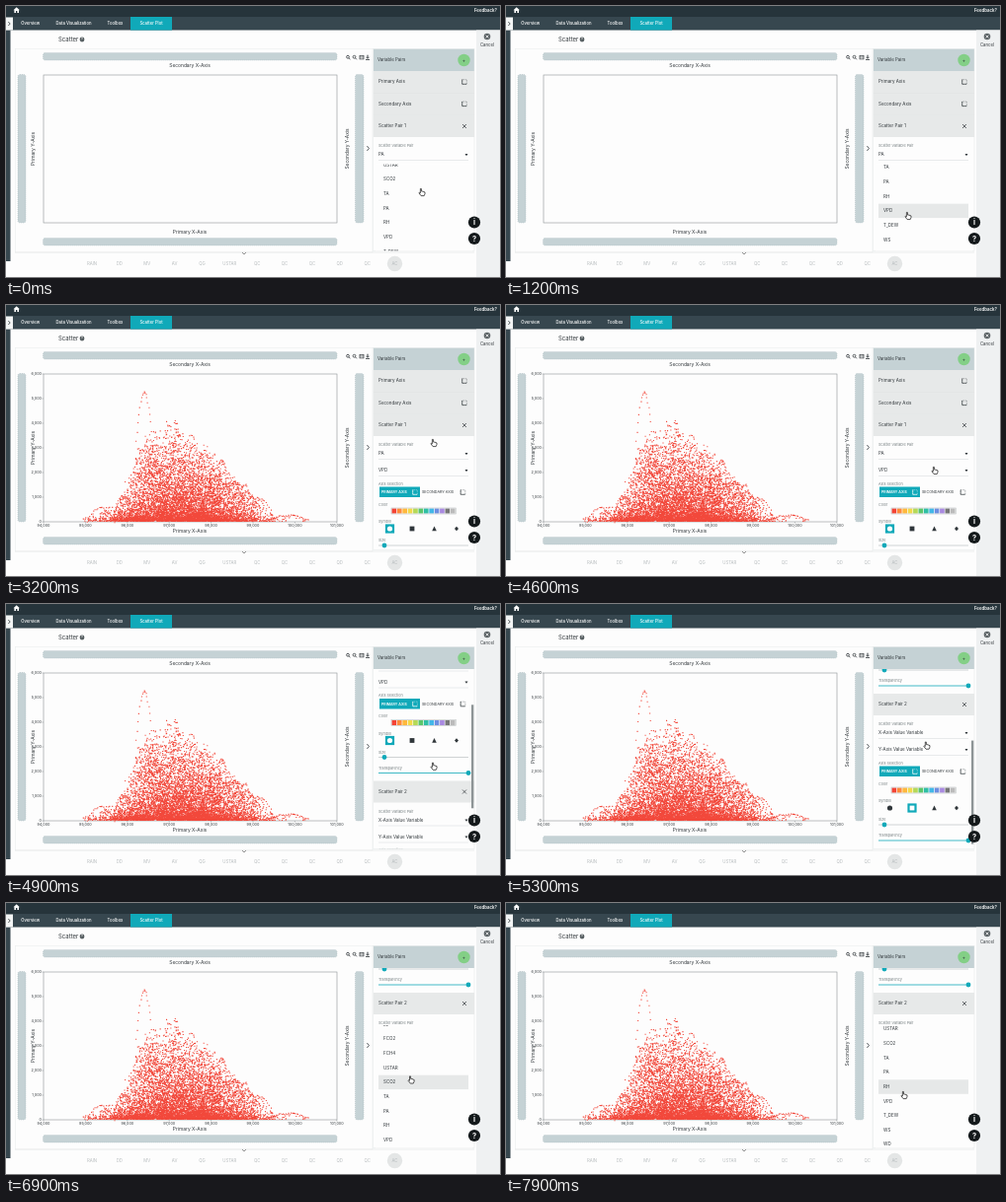
These frames come from a looping animation (500x275 px, 8000 ms). An HTML page with a canvas:

```html
<!DOCTYPE html>
<html lang="en">
<head>
<meta charset="utf-8">
<title>Scatter plot setup</title>
<style>
html, body { margin: 0; width: 100%; height: 100%; overflow: hidden; background: #fdfdfd; }
canvas { display: block; width: 500px; height: 275px; }
</style>
</head>
<body>
<canvas id="stage"></canvas>
<script>
const W = 500, H = 275, LOOP = 8000, STEP = 100;
const canvas = document.getElementById('stage');
const g = canvas.getContext('2d');
const dpr = window.devicePixelRatio || 1;
canvas.width = W * dpr;
canvas.height = H * dpr;

const INK = '#30363a', BAR = '#c5d2d5', TEAL = '#10a9b9', SLATE = '#37474f';
const PALE = '#e7e9e9', GREY = '#788083', PAGE = '#fdfdfd';
const VARIABLES = ['X-Axis Value Variable', 'TAU', 'H', 'LE', 'FCO2', 'FCH4', 'USTAR', 'SCO2',
  'TA', 'PA', 'RH', 'VPD', 'T_DEW', 'WS', 'WD', 'MO'];
const SWATCHES = ['#f44336', '#ff8a3c', '#ffb83d', '#f3d94a', '#b5d957', '#5cc66b', '#2fbfa5',
  '#42b6e8', '#6f8fe0', '#a98ae0', '#777', '#bbb'];
const ROW = 14.65;

// [time, value...] keys, eased between neighbours
const CURSOR = [[0, 421, 189], [500, 421, 189], [1000, 407, 213], [1500, 407, 213], [2300, 433, 140],
  [3500, 433, 140], [3800, 463, 58], [4100, 463, 58], [4500, 434, 168], [4800, 434, 168],
  [5200, 428, 147], [5500, 420, 134], [5700, 420, 134], [6100, 414, 171], [6500, 414, 171], [7500, 403, 195]];
const FIRST_LIST = [[0, 57.5], [800, 84.3]];
const SECOND_LIST = [[6300, 0], [7400, 91]];
const PANEL = [[4600, 0], [5200, 177]];
const CLOSE_FIRST = 1500, SHOW_PLOT = 1900, ADD_PAIR = 4000, OPEN_SECOND = 5600;

function at(keys, t) {
  const i = keys.findIndex(k => k[0] > t);
  if (i === 0) return keys[0].slice(1);
  if (i < 0) return keys[keys.length - 1].slice(1);
  const a = keys[i - 1], b = keys[i];
  let u = (t - a[0]) / (b[0] - a[0]);
  u = u * u * (3 - 2 * u);
  return a.slice(1).map((v, j) => v + (b[j + 1] - v) * u);
}

function rect(x, y, w, h, color) {
  g.fillStyle = color;
  g.fillRect(x, y, w, h);
}
function box(x, y, w, h, color, width = .6) {
  g.strokeStyle = color;
  g.lineWidth = width;
  g.strokeRect(x, y, w, h);
}
function disc(x, y, r, color) {
  g.fillStyle = color;
  g.beginPath();
  g.arc(x, y, r, 0, 7);
  g.fill();
}
function path(points, stroke, width = .8, fill) {
  g.beginPath();
  for (let i = 0; i < points.length; i += 2) g.lineTo(points[i], points[i + 1]);
  if (fill) { g.fillStyle = fill; g.fill(); }
  if (stroke) { g.strokeStyle = stroke; g.lineWidth = width; g.stroke(); }
}
function text(s, x, y, size = 4.5, color = INK, align = 'left', weight = 400) {
  g.font = `${weight} ${size}px Inter, sans-serif`;
  g.fillStyle = color;
  g.textAlign = align;
  g.textBaseline = 'middle';
  g.fillText(s, x, y);
}
function sideText(s, x, y) {
  g.save();
  g.translate(x, y);
  g.rotate(-Math.PI / 2);
  text(s, 0, 0, 4.9, INK, 'center');
  g.restore();
}
function clipped(x, y, w, h, draw) {
  g.save();
  g.beginPath();
  g.rect(x, y, w, h);
  g.clip();
  draw();
  g.restore();
}
function cross(x, y, r, color) {
  path([x - r, y - r, x + r, y + r], color, .7);
  path([x - r, y + r, x + r, y - r], color, .7);
}
function axisIcon(x, y, color) {
  g.setLineDash([.8, .8]);
  box(x - 2.3, y - 2.3, 4.6, 4.6, color, .5);
  g.setLineDash([]);
  path([x - 2.3, y - 2.3, x - 2.3, y + 2.3, x + 2.3, y + 2.3], color, .6);
}

// Points crowd the floor and thin out towards the outline
const cloud = (() => {
  let seed = 11;
  const rnd = () => (seed = seed * 16807 % 2147483647) / 2147483647;
  const top = [[76, 216], [95, 207], [112, 198], [122, 174], [131, 148], [140, 128], [152, 124], [168, 108],
    [180, 124], [195, 136], [213, 149], [228, 165], [242, 178], [256, 194], [275, 210], [307, 217]];
  const edge = x => {
    const i = Math.max(1, top.findIndex(p => p[0] >= x)), a = top[i - 1], b = top[i];
    return a[1] + (b[1] - a[1]) * (x - a[0]) / (b[0] - a[0]);
  };
  const p = new Path2D();
  const dot = (x, y) => p.rect(x - .55, y - .55, 1.1, 1.1);
  for (let i = 0; i < 7000; i++) {
    const x = 178 + (rnd() + rnd() + rnd() + rnd() - 2) * 58;
    if (x < 77 || x > 306) continue;
    dot(x, 219.5 - (219.5 - edge(x)) * rnd() ** 1.2 * rnd());
  }
  for (let i = 0; i < 500; i++) dot(105 + rnd() * 150, 219.4 - rnd() * rnd() * 8);
  for (let i = 0; i < 130; i++) dot(78 + rnd() * 228, 219.4 - rnd() * rnd() * 5);
  const arc = (cx, y, w, h, n) => {
    for (let i = 0; i <= n; i++) {
      const u = i / n * 2 - 1;
      dot(cx + u * w + rnd() - .5, y + h * u * u + rnd() * 2);
    }
  };
  arc(140, 88, 8, 50, 18);
  arc(96, 205, 14, 14, 20);
  arc(286, 213, 20, 5, 30);
  for (let i = 0; i < 45; i++) {
    const cx = 115 + rnd() * 145, y = 219 - (219 - edge(cx)) * (.6 + .4 * rnd());
    arc(cx, y, 5 + rnd() * 7, (219 - y) * .7, 14);
  }
  return p;
})();

function header() {
  rect(0, 0, W, 11, '#26343b');
  rect(0, 11, W, 13.5, SLATE);
  path([7.5, 4.3, 10.7, 1.3, 13.9, 4.3, 13, 4.3, 13, 7, 11.4, 7, 11.4, 5, 10, 5, 10, 7, 8.4, 7, 8.4, 4.3], null, 0, '#fff');
  text('Feedback?', 497, 4.3, 4.4, '#fff', 'right', 600);
  rect(126, 11, 42, 13.5, TEAL);
  [['Overview', 24.7], ['Data Visualization', 68.5], ['Toolbox', 110.5], ['Scatter Plot', 147]]
    .forEach(([s, x]) => text(s, x, 18, 4.2, '#fff', 'center', 500));
  rect(0, 24.5, 4.5, 234.5, SLATE);
  rect(0, 11.5, 7, 13, '#f3f5f5');
  path([2.3, 16, 4.2, 18, 2.3, 20], INK);
  rect(476, 24.5, 24, 251, '#eff1f2');
  disc(487, 31, 3.3, '#60676a');
  cross(487, 31, 1.4, '#fff');
  text('Cancel', 487, 40, 4.3, INK, 'center');
  text('Scatter', 53, 34, 6);
  disc(77, 34, 2.4, '#555d60');
  text('?', 77, 34.2, 3.3, '#fff', 'center', 600);
}

function handle(x, y, w, h) {
  g.beginPath();
  g.roundRect(x, y, w, h, 2);
  g.fillStyle = BAR;
  g.fill();
  g.strokeStyle = '#a9b8bc';
  g.lineWidth = .5;
  g.setLineDash([1, 1]);
  g.stroke();
  g.setLineDash([]);
}

function chart(t) {
  box(9.5, 43.5, 361.5, 206.5, '#eceeee');
  handle(37.5, 47.5, 297.5, 7.5);
  handle(37.5, 235.5, 297.5, 7.5);
  handle(12, 69.5, 8, 150.5);
  handle(353.5, 69.5, 8.5, 150.5);
  text('Secondary X-Axis', 186, 61, 4.9, INK, 'center');
  text('Primary X-Axis', 186, 230, 4.9, INK, 'center');
  sideText('Primary Y-Axis', 27.5, 145);
  sideText('Secondary Y-Axis', 346, 145);
  box(38, 70, 297, 150, '#8d9294', .6);
  [346, 352.5].forEach(x => {
    g.strokeStyle = INK;
    g.lineWidth = .8;
    g.beginPath();
    g.arc(x, 51.7, 1.4, 0, 7);
    g.stroke();
    path([x + 1, 52.8, x + 2.4, 54.3], INK);
  });
  box(358, 50.3, 4, 3.6, INK, .7);
  path([358, 52, 362, 52], INK, .6);
  path([366, 49.7, 366, 53], INK, 1);
  path([364.5, 51.8, 366, 53.4, 367.5, 51.8], INK);
  path([364, 54.5, 368, 54.5], INK);
  path([365.4, 142, 367.4, 144.5, 365.4, 147], INK);
  if (t < SHOW_PLOT) return;
  for (let i = 0; i < 7; i++) {
    const y = 220 - i * 25;
    text(i ? i + ',000' : '0', 36, y, 3.8, INK, 'right');
    path([36.5, y, 38, y], '#858b8d', .5);
  }
  for (let i = 0; i < 8; i++) {
    const x = 38 + i * 42.4;
    text(94 + i + ',000', x, 224, 3.8, INK, 'center');
    path([x, 220, x, 221.5], '#858b8d', .5);
  }
  g.fillStyle = '#f2483b';
  g.fill(cloud);
}

function footer() {
  path([9, 250, 474, 250], '#e3e6e6', .7);
  path([239, 250, 241, 252, 243, 250], '#777');
  disc(393.5, 261.5, 7.7, '#e4e6e6');
  ['RAIN', 'DD', 'MV', 'AV', 'QG', 'USTAR', 'QC', 'QC', 'QC', 'QD', 'QC', 'AC']
    .forEach((s, i) => text(s, 87 + i * 27.86, 261.5, 4.3, '#b7bcbe', 'center'));
}

function select(label, y) {
  text(label, 377, y, 4.5);
  path([377, y + 5.5, 468, y + 5.5], '#d3d7d8', .5);
  path([464.5, y - .9, 467.5, y - .9, 466, y + 1.2], null, 0, INK);
}

function slider(label, y, x) {
  text(label, 377, y, 3.7, GREY);
  path([377, y + 5, 468, y + 5], x > 400 ? TEAL : '#c5cacb', .8);
  disc(x, y + 5, 2.4, TEAL);
}

// One variable pair; y is the middle of its title row
function pair(n, y, xName, yName) {
  rect(372, y - 11, 102, 22, PALE);
  text('Scatter Pair ' + n, 377, y);
  cross(464, y, 2, INK);
  text('Scatter Variable Pair', 377, y + 20, 3.7, GREY);
  select(xName, y + 29);
  select(yName, y + 46);
  text('Axis Selection', 377, y + 59.5, 3.7, GREY);
  rect(378, y + 62.5, 41, 10.5, TEAL);
  text('PRIMARY AXIS', 380, y + 68, 3.6, '#fff', 'left', 600);
  axisIcon(414, y + 68, '#fff');
  text('SECONDARY AXIS', 421, y + 68, 3.7);
  axisIcon(462.5, y + 68, INK);
  text('Color', 377, y + 80.5, 3.7, GREY);
  SWATCHES.forEach((c, i) => rect(390.5 + i * 5.4, y + 84.5, 4.7, 5, c));
  box(390, y + 84, 65.4, 6, '#b0b5b6', .5);
  text('Symbol', 377, y + 98, 3.7, GREY);
  const chosen = n > 1 ? 411 : 388.5;
  rect(chosen - 4.6, y + 100.4, 9.2, 9.2, TEAL);
  disc(388.5, y + 105, 2.6, n > 1 ? INK : '#fff');
  rect(408.6, y + 102.6, 4.8, 4.8, n > 1 ? '#fff' : INK);
  path([433.5, y + 102.4, 435.8, y + 107.2, 431.2, y + 107.2], null, 0, INK);
  path([456, y + 102.7, 458, y + 105, 456, y + 107.3, 454, y + 105], null, 0, INK);
  slider('Size', y + 117, 383);
  slider('Transparency', y + 133, 468);
}

function list(clipTop, scroll, hover) {
  clipped(374, clipTop, 98, 248.5 - clipTop, () => {
    rect(374, clipTop, 98, 125, PAGE);
    VARIABLES.forEach((s, i) => {
      const y = 131 + i * ROW - scroll;
      if (i === 0 || i === hover) rect(377, y - 7.2, 91, ROW - .2, i ? '#e6e8e8' : '#d9dcdc');
      text(s, 382, y, 4.5, i ? INK : '#90979a');
    });
  });
}

function panel(t, tipY) {
  const [shift] = at(PANEL, t);
  rect(371.5, 43, 102.5, 206, PAGE);
  clipped(371.5, 66, 103, 182.5, () => {
    g.save();
    g.translate(0, -shift);
    rect(372, 66, 102, 67, PALE);
    ['Primary Axis', 'Secondary Axis'].forEach((s, i) => {
      text(s, 377, 77 + i * 22.3);
      axisIcon(464, 77 + i * 22.3, INK);
    });
    path([372, 88.5, 474, 88.5], '#dee1e1', .5);
    path([372, 111, 474, 111], '#dee1e1', .5);
    pair(1, 122, 'PA', t < CLOSE_FIRST ? '' : 'VPD');
    if (t >= ADD_PAIR) pair(2, 279, VARIABLES[0], 'Y-Axis Value Variable');
    g.restore();
    if (shift > 0 && t < OPEN_SECOND) rect(471, 66 + shift * .41, 2.4, 105, '#8d9496');
  });
  rect(372, 43.5, 102, 22.5, BAR);
  text('Variable Pairs', 376, 55, 4.4);
  disc(463.5, 55, 6.2, '#83cf86');
  text('+', 463.5, 55, 5, INK, 'center');
  box(371.5, 43.5, 102.5, 205, '#e4e7e7', .5);

  const hoverAt = scroll => Math.round((tipY - 131 + scroll) / ROW);
  if (t < CLOSE_FIRST) {
    const [scroll] = at(FIRST_LIST, t);
    list(160.5, scroll, t < 800 ? -1 : hoverAt(scroll));
  } else if (t >= OPEN_SECOND) {
    const [scroll] = at(SECOND_LIST, t);
    list(124, scroll, hoverAt(scroll));
  }
}

function hand(x, y) {
  g.save();
  g.translate(x, y);
  g.lineJoin = 'round';
  path([-1.6, -3.6, -.6, -3.6, -.4, -.9, .7, -1, .9, -.6, 1.8, -.7, 2.1, -.2, 3, -.1, 3, 1.6, 2.2, 3.6,
    -.9, 3.6, -3, .9, -2.6, .2, -1.6, .9, -1.6, -3.6], '#222', .75, '#fff');
  g.restore();
}

function draw(now) {
  const t = Math.floor(now % LOOP / STEP) * STEP;
  const [x, y] = at(CURSOR, t);
  g.setTransform(dpr, 0, 0, dpr, 0, 0);
  rect(0, 0, W, H, PAGE);
  header();
  chart(t);
  footer();
  panel(t, y - 4);
  [['i', 219.5], ['?', 236]].forEach(([s, cy]) => {
    disc(474, cy, 6.1, '#14191b');
    text(s, 474, cy + .3, 7.5, '#fff', 'center', 700);
  });
  hand(x, y);
}

const start = performance.now();
function frame() {
  draw(performance.now() - start);
  requestAnimationFrame(frame);
}
frame();
</script>
</body>
</html>
```
